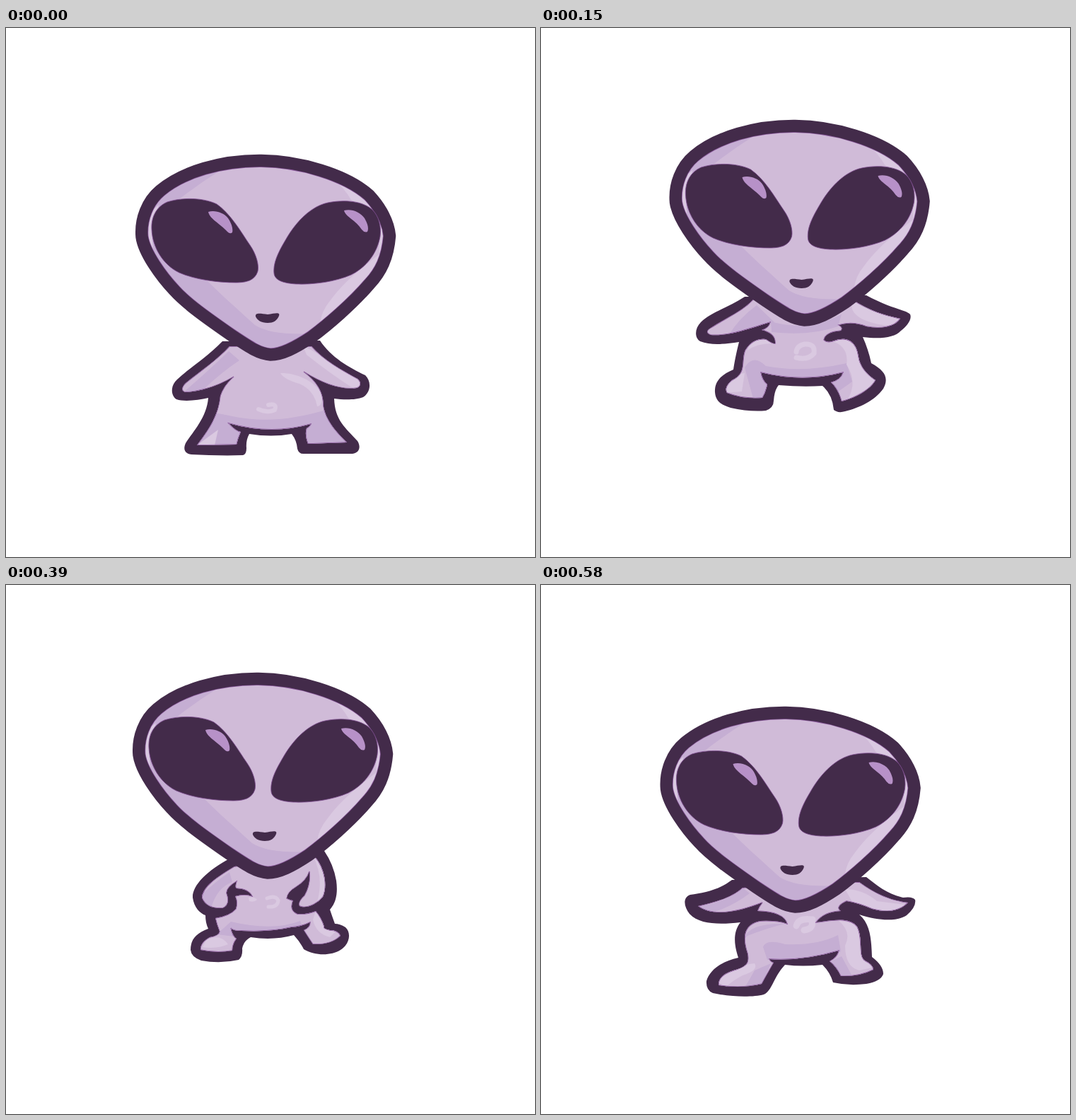
Recreate the animation shown at these times as an HTML page. Size 748 px wide and 748 px high, loop 0.63 s.

```html
<!DOCTYPE html>
<html>
<head>
<meta charset="utf-8">
<style>
  html, body { margin: 0; height: 100%; overflow: hidden; background: #fff; }
  svg { display: block; width: 100vw; height: 100vh; }
  .ink { fill: #432b4a; }
  .skin { fill: #d0bbd8; }
  .dim { fill: #c5aed3; }
  .lit { fill: #dac9e1; }
  .swirl { fill: none; stroke: #dac9e1; stroke-linecap: round; }
  .rim { fill: none; stroke: #8d5c9f; }
  .eye { stroke: #7d4c8f; stroke-width: .8; }
  .glint { fill: #b791c8; }
</style>
</head>
<body>
<svg viewBox="0 0 748 748">
  <defs>
    <path id="skull" d="M361 187.500C415 188 480 207 513 236C530 254 541 275 542.500 294C540 325 530 345 514 362C490 390 455 420 432 437C408 453 390 462 374 462C358 461 345 452 318 434C285 411 255 390 238 371C220 352 195 318 192 295C190 270 200 245 218 230C250 203 305 187 361 187.500Z"/>
    <clipPath id="skullClip"><use href="#skull"/></clipPath>
    <g id="head">
      <use href="#skull" class="skin"/>
      <g clip-path="url(#skullClip)">
        <path class="dim" d="M195 285L285 358C305 378 330 400 352 420Q375 435 435 432L375 470L180 350ZM302 202Q270 222 240 246L200 262L240 205Z"/>
        <path class="lit" d="M462 212Q478 226 488 243L525 262L528 320Q480 355 458 386Q446 400 444 418L560 340V250L500 210ZM201 262Q196 290 208 315L206 285L216 250Z"/>
        <use href="#skull" class="rim" stroke-width="19"/>
      </g>
      <use href="#skull" fill="none" stroke="#432b4a" stroke-width="17.500"/>
      <path class="ink eye" d="M206 285C205 268 212 253 228 246C250 239 280 240 298 249C318 263 332 288 345 307C354 320 358 335 356 344C352 357 340 360 325 360C300 360 268 356 245 346C222 335 207 310 206 285Z"/>
      <path class="ink eye" d="M379 347C377 330 388 312 398 295C412 272 432 252 455 247C480 242 505 245 518 257C527 266 531 280 529 295C525 318 510 338 488 349C465 359 435 363 410 362C393 361 380 357 379 347Z"/>
      <path class="glint" d="M286 260C295 257 308 261 314 269C320 278 321 285 320 289Q317 292 313 288C302 276 288 270 286 260ZM478 258C488 255 501 260 507 269C512 278 513 284 511 288Q507 290 503 285C495 272 480 267 478 258Z"/>
      <path class="ink" d="M353 408C352 402 360 404 370 405C380 404 388 401 386 407C383 414 378 417 370 417C361 417 355 413 353 408Z"/>
    </g>
  </defs>
  <g id="stage"></g>
</svg>
<script>
// Pose with hands on the hips: two frames share it and differ only in the legs.
const hips = legs => ({
  ink: 'M320 358C285 376 265 398 266 414C268 428 276 436 284 439Q284 450 288 458C272 464 263 472 263 488Q264 498 278 503Q305 508 331 502Q337 497 336 486Q338 475 348 470Q380 475 409 467Q418 477 423 487C440 497 462 496 475 488C489 479 490 463 482 456Q474 451 467 451Q463 440 460 431C470 420 471 405 469 390Q465 367 452 348Z',
  skin: 'M325 370L438 355C455 375 456 400 450 413C440 425 425 430 417 426Q414 420 424 411Q433 395 431 377Q427 390 412 399Q400 406 399 415Q405 418 408 418Q402 432 414 437Q428 438 440 433Q448 442 452 455' +
    legs + 'Q318 440 327 430Q330 420 326 412Q340 408 350 412Q345 402 328 401Q325 400 328 391Q313 400 314 408Q320 424 308 429Q285 430 279 414C280 398 300 385 325 370Z',
  dim: 'M276 412Q300 390 318 378L322 392Q300 400 292 429ZM320 448Q380 462 418 447L430 482L300 466Z',
  lit: 'M436 355Q452 385 442 420L460 415L460 370ZM285 474Q305 464 316 480Q300 487 280 484ZM440 433L452 452L470 460L460 470Q440 465 436 445ZM345 414Q353 412 357 417Q353 421 346 419Z',
  swirl: 'M371 415Q383 410 387 418Q386 428 373 427', swirlWidth: 5
});

const poses = [
  { start: 0, head: [0, 0], body: [0, 0],
    ink: 'M306 443C285 465 260 480 242 497C232 506 233 520 241 525C253 529 272 526 286 523C284 550 265 570 254 587C250 596 253 602 262 603C285 604 310 605 335 604Q340 603 340 594Q339 583 344 574Q375 579 404 574Q411 583 412 595Q414 603 422 602L490 602C500 601 502 592 497 584C480 565 465 555 464 524C478 526 495 526 505 522C516 515 517 500 508 491C485 480 460 466 444 442Z',
    skin: 'M316 450L432 450C450 470 475 484 497 496C503 501 502 507 496 509C475 512 450 504 421 486C440 500 449 515 449 535C452 555 468 572 482 586L427 588Q422 575 425 566Q430 563 431 560Q375 576 315 559Q325 570 332 571Q328 580 326 589L270 590C285 570 300 550 303 520Q308 505 322 493Q290 512 255 515C247 514 248 508 254 502C275 485 300 468 316 450Z',
    dim: 'M285 542Q300 545 320 549Q380 562 452 540L500 600H250ZM245 520Q275 495 315 457L330 470Q300 490 270 520Z',
    lit: 'M420 450Q440 458 460 475L505 500L495 512Q460 490 425 462ZM388 488C410 487 440 500 447 520Q447 535 440 535Q436 512 415 503Q393 497 388 488ZM270 590L300 568L295 590Z',
    swirl: 'M357 539Q370 545 380 540Q384 530 371 533', swirlWidth: 6 },

  { start: 150, head: [-1.5, -49], body: [0, 0],
    ink: 'M288 380C265 395 240 402 226 416C217 425 217 438 225 443C240 449 260 447 280 444C276 460 274 470 272 483C255 490 245 500 246 515C247 528 255 533 268 537Q295 543 318 541Q329 537 329 527Q330 512 336 505Q370 508 398 506Q412 518 414 540Q420 545 430 542C450 537 472 527 484 510C492 495 487 485 467 474C464 460 460 448 455 437C480 440 500 438 509 428C517 422 525 412 522 405C517 399 495 397 460 378Z',
    skin: 'M300 384L440 384C465 400 485 406 508 411C500 423 480 426 460 422Q440 414 421 420Q428 424 424 428Q402 430 400 441Q405 446 415 442C432 436 446 442 449 465Q452 484 473 498C465 512 445 523 425 528Q420 510 410 501Q424 497 427 487Q370 502 311 487Q313 498 320 504Q318 515 313 523Q285 525 263 516Q258 508 270 498C292 488 282 470 289 455Q300 438 318 440Q328 447 331 446Q332 432 312 427Q322 424 324 416C295 425 265 436 240 434Q230 430 240 424C265 408 285 400 300 384Z',
    dim: 'M265 435Q280 410 305 392L330 416ZM288 480Q300 460 318 478Q370 488 432 474L440 500L412 520L300 524ZM325 415Q375 430 425 405L420 422Q380 436 326 430Z',
    lit: 'M440 388Q436 402 455 412Q475 421 500 421L512 408L455 380ZM258 516Q268 490 288 488L284 514ZM410 442Q436 450 432 476Q448 500 434 525L480 500L455 450L430 435ZM292 456Q305 446 326 446L316 438L296 442Z',
    swirl: 'M361 466Q378 470 386 460Q388 446 373 447Q362 449 361 458', swirlWidth: 7 },

  { start: 270, head: [-14, -71], body: [0, 0],
    ...hips('Q442 460 442 461Q455 459 466 460Q476 464 472 471Q462 480 440 479Q425 465 411 446Q412 455 414 460Q385 463 352 460Q356 450 356 445Q340 455 332 470Q325 478 318 479Q325 485 322 490Q300 494 277 488Q275 478 288 470Q300 467 318 478Q305 465 298 443') },

  { start: 390, head: [-4, -55], body: [-2, 28],
    ...hips('Q450 458 460 460Q472 460 475 468Q462 481 436 480Q428 468 423 460Q432 456 432 449Q420 455 405 456Q375 463 335 461Q322 461 320 457Q322 468 328 472Q322 480 322 489Q300 493 277 488Q276 478 290 470Q303 468 304 462Q300 452 298 443') },

  { start: 510, head: [-14.5, -7], body: [0, 0],
    ink: 'M270 417C250 432 230 435 211 438C200 442 202 455 210 465C225 481 255 480 282 477C270 492 274 512 279 527C255 532 238 545 234 560Q233 573 243 577C270 583 300 583 315 579C327 574 328 555 345 537Q370 540 398 537Q409 548 413 562Q435 567 460 564Q481 560 484 550Q484 538 468 526C467 505 467 480 450 466C480 476 505 475 517 467Q531 455 529 445Q525 440 512 442C490 437 475 425 460 413Z',
    skin: 'M285 428L450 420C475 438 495 446 519 449C508 461 490 464 468 458Q450 450 432 447Q415 455 424 461Q400 462 389 477C410 475 435 468 447 483C456 500 448 525 458 531Q470 537 470 544Q450 554 424 553Q418 540 408 532Q419 526 421 517Q370 532 323 529Q325 533 329 534Q322 546 312 564Q285 571 251 566Q250 552 272 545C290 540 295 535 292 521C285 500 285 480 310 475Q335 474 348 479Q343 462 306 461Q308 455 313 449C285 460 245 471 222 454C245 449 270 442 285 428Z',
    dim: 'M222 454Q260 450 285 428L295 436Q270 455 240 464ZM288 500Q292 478 345 479Q320 485 292 496ZM314 512Q318 500 345 508Q390 510 420 495L424 518L400 532L320 530ZM410 532L425 525L440 553H424ZM302 545L325 535L312 566H290Z',
    lit: 'M430 430Q455 430 475 447L515 452L490 465L440 448ZM251 562Q260 540 302 535Q308 545 285 552Q270 560 262 568ZM420 474Q440 490 430 510Q430 540 450 545L472 540L450 480Z',
    swirl: 'M361 482Q364 470 384 473M372 488Q386 486 383 475', swirlWidth: 9 }
];

const figure = (p, i) => `
  <g visibility="hidden">
    <g transform="translate(${p.body})">
      <clipPath id="skin${i}"><path d="${p.skin}"/></clipPath>
      <path class="ink" d="${p.ink}"/>
      <path class="skin" d="${p.skin}"/>
      <g clip-path="url(#skin${i})">
        <path class="dim" d="${p.dim}"/>
        <path class="lit" d="${p.lit}"/>
        <path class="swirl" d="${p.swirl}" stroke-width="${p.swirlWidth}"/>
        <path class="rim" d="${p.skin}" stroke-width="1.4"/>
      </g>
    </g>
    <use href="#head" transform="translate(${p.head})"/>
  </g>`;

const stage = document.getElementById('stage');
stage.innerHTML = poses.map(figure).join('');
const figures = [...stage.children];
const LOOP = 630;
const origin = performance.now();

function draw(now) {
  const t = Math.max(0, now - origin) % LOOP;
  const current = poses.findLastIndex(p => p.start <= t);
  figures.forEach((g, i) => g.setAttribute('visibility', i === current ? 'visible' : 'hidden'));
  requestAnimationFrame(draw);
}
draw(origin);
</script>
</body>
</html>
```
